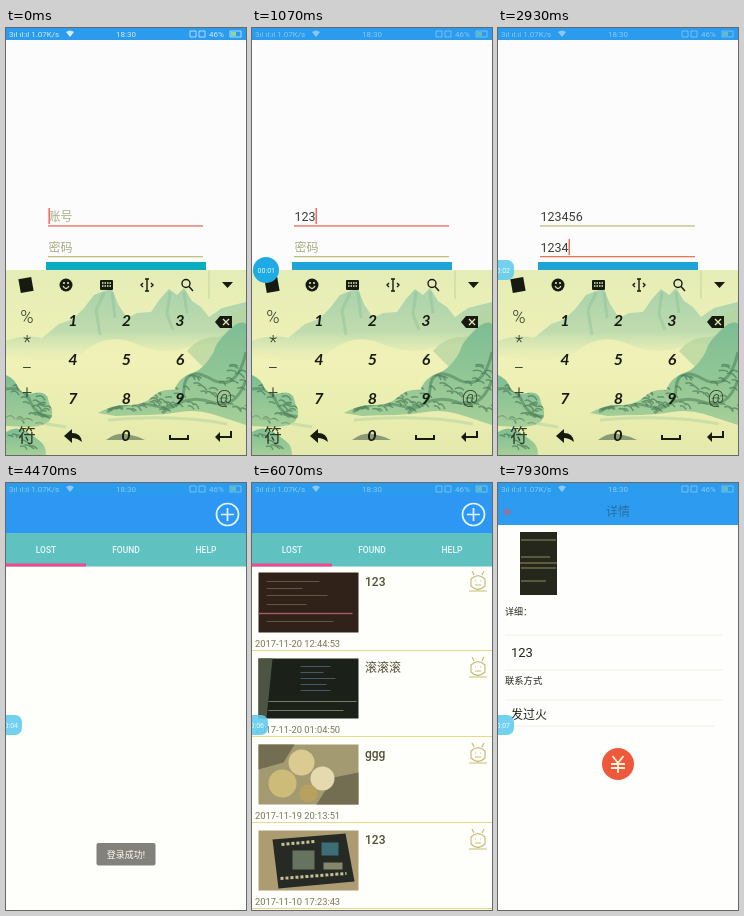
Recreate the animation shown at these times as an HTML page. Size 240 px wide and 427 px high, loop 8 s.

```html
<!DOCTYPE html>
<html lang="zh">
<head>
<meta charset="utf-8">
<style>
html, body { margin: 0; width: 100%; height: 100%; overflow: hidden; background: #fdfdfc; }
svg { display: block; width: 100vw; height: 100vh; }
text { font-family: Roboto, "Noto Sans CJK SC", "Noto Sans CJK", sans-serif; }
.mid { text-anchor: middle; }
.num { font: italic 700 16px Lato, sans-serif; text-anchor: middle; fill: #171a10; }
.sym { font-size: 18px; font-weight: 300; text-anchor: middle; fill: #303a24; }
.line { fill: none; stroke: #171a10; stroke-width: 2; }
.thin { stroke-width: 1.4; }
</style>
</head>
<body>
<svg viewBox="0 0 240 427" preserveAspectRatio="none">
  <defs>
    <linearGradient id="sky" x1="0" y1="0" x2="0" y2="1">
      <stop offset="0" stop-color="#e4edb6"/><stop offset=".5" stop-color="#f0f1b6"/><stop offset="1" stop-color="#e4eaab"/>
    </linearGradient>
    <linearGradient id="far" x1="0" y1="0" x2="0" y2="1">
      <stop offset="0" stop-color="#a9d2ab"/><stop offset=".6" stop-color="#c0dcae"/><stop offset="1" stop-color="#e8efb6" stop-opacity=".2"/>
    </linearGradient>
    <linearGradient id="near" x1="0" y1="0" x2="0" y2="1">
      <stop offset="0" stop-color="#7dbd94"/><stop offset="1" stop-color="#a5cf97"/>
    </linearGradient>
    <clipPath id="pages"><rect y="84" width="240" height="343"/></clipPath>
    <clipPath id="land">
      <path id="rightHill" d="M92 385Q108 376 122 377T146 369 168 362Q174 349 184 346T201 334 209 320 222 303 240 296V397Q222 391 206 386T174 384 143 387 110 388Z"/>
      <path id="leftHill" d="M0 347Q8 350 12 359T29 365 43 375Q49 385 44 392T20 399L0 398Z"/>
      <path id="rocks" d="M0 404Q10 397 21 404T36 415 40 427H0Z"/>
    </clipPath>
  </defs>
  <rect width="240" height="427" fill="#fcfcfd"/>

  <g id="login">
    <text id="user" x="42.5" y="193"/>
    <text id="pass" x="42.5" y="224"/>
    <rect id="userLine" x="42" y="197.3" width="155" height="1.3"/>
    <rect id="passLine" x="42" y="228" width="155" height="1.3"/>
    <rect id="caret" width="1.3" height="16" fill="#ef5548"/>
    <rect id="button" x="40" y="234" width="160" height="34"/>
    <g id="keyboard">
      <rect y="242" width="240" height="185" fill="url(#sky)"/>
      <path d="M0 313Q18 306 36 310L53 296 67 291 78 280 88 267 98 263 106 261 112 276 121 290 131 285 145 284 154 271 163 261 171 267 178 260 186 273 195 279 203 289 216 280 240 274V325Q208 310 183 319T130 316 79 323 0 327Z" fill="url(#far)"/>
      <path d="M98 265L90 282 94 307M106 264L109 290M164 264L161 286 167 302M178 264L181 285" fill="none" stroke="#82b795" stroke-width="3" opacity=".35"/>
      <path d="M181 323Q193 309 209 309T225 286L240 281V335L202 344Z" fill="#b5d49f" opacity=".75"/>
      <g fill="url(#near)"><use href="#rightHill"/><use href="#leftHill"/><use href="#rocks"/></g>
      <g clip-path="url(#land)">
        <path id="trees" fill="none" stroke="#39684a" stroke-width="1.5" opacity=".55"/>
        <path d="M101 384Q123 371 150 378T178 361 205 351 240 324M156 385Q181 365 205 374T240 352M0 361Q18 358 24 373T48 389" fill="none" stroke="#437b55" stroke-width="3" opacity=".5"/>
      </g>
      <path d="M0 388Q33 395 60 399M102 392Q170 386 221 396" fill="none" stroke="#a9cca0" stroke-width="3" opacity=".45"/>
      <path d="M100 412Q111 404 121 406T139 412Z" fill="#8a9b76"/>
      <path d="M203 243V271" stroke="#c1d39a"/>
      <rect x="13.500" y="250" width="13" height="14" fill="#171a10" transform="rotate(-10 20 257)"/>
      <g fill="#171a10">
        <circle cx="60" cy="257" r="6.500"/>
        <rect x="94" y="252" width="13" height="10" rx="1"/>
        <path d="M216 254H227L221.500 260ZM209 294L214 288H226V300H214Z"/>
        <path d="M58 408L66 401V405Q75 405 76 414 71 410 66 410V415Z"/>
        <path d="M209 409L214 404V408H224V403H226V410H214V414Z"/>
      </g>
      <path d="M96 255H105M96 258H105" stroke="#e2efb4" stroke-width="1.300" stroke-dasharray="1.500 1"/>
      <path d="M57 255H59M61 255H63M57 258Q60 263 63 258M217 291L223 297M223 291L217 297" stroke="#e2efb4" stroke-width="1.300" fill="none"/>
      <path class="line thin" d="M141 251V263M139 251H143M139 263H143M137 255L135 257 137 259M145 255L147 257 145 259M183 258.500L187 263"/>
      <path class="line" d="M164 407V411H182V407"/>
      <circle class="line thin" cx="180" cy="255.500" r="4"/>
      <g id="keys"></g>
    </g>
  </g>

  <g id="main">
    <rect width="240" height="427" fill="#fefefb"/>
    <g clip-path="url(#pages)"><g id="list"></g></g>
    <rect width="240" height="51" fill="#2d97f3"/>
    <rect y="50" width="240" height="33.500" fill="#5fc2c1"/>
    <g fill="#e8fafa" font-size="8.500" font-weight="500" class="mid">
      <text x="40" y="70">LOST</text><text x="120" y="70">FOUND</text><text x="200" y="70">HELP</text>
    </g>
    <rect id="mark" y="80.500" width="80" height="3" fill="#ef4b8e"/>
    <g fill="none" stroke="#e4f6ff" stroke-width="1.700">
      <circle cx="221.500" cy="31.500" r="11"/><path d="M215 31.500H228M221.500 25V38"/>
    </g>
  </g>

  <g id="detail">
    <rect width="240" height="427" fill="#fefefc"/>
    <rect width="240" height="42" fill="#2d9cf0"/>
    <path d="M14 29H7M10 25L6.500 29 10 33" fill="none" stroke="#c0627d" stroke-width="1.500"/>
    <text class="mid" x="120" y="33" font-size="12" fill="#286f9f">详情</text>
    <rect x="22" y="49" width="37" height="63" fill="#25271c"/>
    <path d="M23 57H58M23 74H52M23 85H58M23 98H48" stroke="#696b47" stroke-width="1.500"/>
    <path d="M22 80H59" stroke="#9c8d55"/>
    <g fill="#24241e">
      <text x="7" y="132" font-size="9" font-weight="500">详细：</text>
      <text x="13" y="174" font-size="13">123</text>
      <text x="7" y="201" font-size="9.300" font-weight="500">联系方式</text>
      <text x="13" y="236" font-size="12">发过火</text>
    </g>
    <path d="M7 152H225M7 187H225M7 217H225M13 243H216" stroke="#f0f0e6"/>
    <circle cx="120" cy="281" r="16" fill="#f0583c"/>
    <path d="M114.500 273L120 280 125.500 273M113 281H127M113 285H127M120 280V290" fill="none" stroke="#fff2d5" stroke-width="1.800"/>
  </g>

  <g id="toast">
    <rect x="90.500" y="360" width="59" height="22.500" rx="2" fill="#28251a"/>
    <text class="mid" x="120" y="375" font-size="9" fill="#fff8e8">登录成功!</text>
  </g>

  <g id="status">
    <rect width="240" height="12" fill="#2b9bee"/>
    <g id="info" fill="#fff" font-size="8">
      <text x="3" y="9">3ıl ıl:ıl 1.07K/s</text>
      <path d="M60 4Q64 1 68 4L64 9Z"/>
      <text class="mid" x="120" y="9">18:30</text>
      <text x="203" y="9">46%</text>
      <path d="M184 3H190V9H184ZM193 3H199V9H193ZM224 3H235V9H224Z" fill="none" stroke="#fff" stroke-width=".8"/>
      <rect x="225" y="4" width="5" height="4" fill="#a5e887"/>
    </g>
  </g>

  <g id="bubble">
    <rect id="blob"/>
    <text id="clock" y="244.500" font-size="7" fill="#e9faff"/>
  </g>
</svg>
<script>
const $ = id => document.getElementById(id);
const LOOP = 8000;
const typed = { user: [470, 670, 930, 1270, 1470, 1670], pass: [2270, 2470, 2600, 2800, 3070, 3270] };
const FOCUS = 2000;
const tabStops = [[4700, 0], [5000, 80], [5130, 80], [5400, 160], [5530, 160], [5730, 80], [5760, 80], [5950, 0]];

const set = (id, attrs) => { for (const k in attrs) $(id).setAttribute(k, attrs[k]); };
const show = (id, on) => { $(id).style.display = on ? '' : 'none'; };
const ramp = (t, a, b) => Math.min(1, Math.max(0, (t - a) / (b - a)));
const smooth = p => p * p * (3 - 2 * p);

function along(stops, t) {
  let value = stops[0][1];
  for (let i = 1; i < stops.length; i++) {
    const [a, from] = stops[i - 1], [b, to] = stops[i];
    if (t >= a) value = from + (to - from) * smooth(ramp(t, a, b));
  }
  return value;
}

const label = (cls, x, y, s) => `<text class="${cls}" x="${x}" y="${y}">${s}</text>`;
let keys = label('num', 120, 413, '0');
for (let i = 0; i < 9; i++) keys += label('num', 67 + i % 3 * 53.500, 297.500 + Math.floor(i / 3) * 39, i + 1);
['%', '*', '_', '+', '符'].forEach((s, i) => keys += label('sym', 21, [295, 320, 339, 370, 414][i], s));
$('keys').innerHTML = keys + label('sym', 218, 375, '@');

// Brushed foliage on the banks, clipped to the land
let seed = 7;
const random = () => (seed = seed * 16807 % 2147483647) / 2147483647;
const tuft = (x, y) => `M${x} ${y}q${2 + random() * 4} ${-4 + random() * 3} ${5 + random() * 5} ${random() * 5}`;
let trees = '';
for (let i = 0; i < 70; i++) {
  const x = 96 + random() * 144;
  trees += tuft(x, 382 - random() * (x - 90) * .38);
}
for (let i = 0; i < 28; i++) trees += tuft(random() * 42, 356 + random() * 40);
for (let i = 0; i < 9; i++) trees += tuft(random() * 30, 402 + random() * 20);
$('trees').setAttribute('d', trees);

// Simplified thumbnails, each 100 by 60
const photos = [
  `<rect width="100" height="60" fill="#302119"/><path d="M8 9H61M8 16H44M8 23H69M8 32H48M8 49H75" stroke="#655343"/>
   <path d="M0 41H94" stroke="#a15a67" stroke-width="1.500"/>`,
  `<rect width="100" height="60" fill="#1b2119"/><path d="M14 0L8 60H0V0Z" fill="#4d5441"/>
   <path d="M42 8H72M42 14H65M42 20H77M42 26H68M42 32H72" stroke="#455969"/><path d="M10 43H98M10 52H85" stroke="#777b62"/>`,
  `<rect width="100" height="60" fill="#a49a72"/><path d="M0 0H36L25 18 0 25ZM58 60L75 33 100 28V60Z" fill="#736e51"/>
   <circle cx="43" cy="18" r="13" fill="#d9cb91"/><circle cx="24" cy="39" r="14" fill="#cdbb79"/>
   <circle cx="64" cy="34" r="12" fill="#e4d9af"/><circle cx="50" cy="49" r="9" fill="#b8a15e"/>`,
  `<rect width="100" height="60" fill="#ad9c72"/><path d="M14 9L87 3 96 51 20 58Z" fill="#252b24"/>
   <path d="M34 20H56V39H34Z" fill="#66735e"/><path d="M63 12H80V25H63Z" fill="#3c6e76"/>
   <path d="M22 48L88 43M23 14L56 11" stroke="#c8c197" stroke-width="3" stroke-dasharray="3 2"/><path d="M65 32H84V39H65Z" fill="#86876a"/>`
];
const rows = [['123', '2017-11-20 12:44:53'], ['滚滚滚', '2017-11-20 01:04:50'], ['ggg', '2017-11-19 20:13:51'], ['123', '2017-11-10 17:23:43']];
$('list').innerHTML = rows.map(([title, date], i) => `<g transform="translate(0 ${84 + i * 86})">
  <g transform="translate(6.500 5.500)">${photos[i]}</g>
  <text x="113" y="18.500" font-size="12" font-weight="500" fill="#505033">${title}</text>
  <text x="3" y="79.500" font-size="9.300" fill="#77775a">${date}</text>
  <path d="M0 83.500H240" stroke="#e5d98a"/>
  <path d="M219 12Q226 5 233 12V19Q226 26 219 19ZM222 8L220 4M230 8L232 4M223 14H224M228 14H229M223 18H229M217 24H235" fill="none" stroke="#c8bc77" stroke-width="1.200"/>
</g>`).join('');

function field(id, t, hint) {
  const n = typed[id].filter(at => t >= at).length;
  $(id).textContent = n ? '123456'.slice(0, n) : hint;
  set(id, { fill: n ? '#3c3c36' : '#a9aa86', 'font-size': n ? 12.5 : 12 });
  return n;
}

function drawLogin(t) {
  const counts = { user: field('user', t, '账号'), pass: field('pass', t, '密码') };
  const onPass = t >= FOCUS, active = onPass ? 'pass' : 'user';
  set('userLine', { fill: onPass ? '#bfc07b' : '#e96758' });
  set('passLine', { fill: onPass ? '#e97555' : '#bfc07b' });
  const n = counts[active];
  const since = t - (n ? typed[active][n - 1] : onPass ? FOCUS : 0);
  set('caret', { x: 42.5 + n * 7.02, y: onPass ? 211 : 180 });
  show('caret', since % 1000 < 500);
  set('button', { fill: t < 70 ? '#08adbe' : t >= 3870 ? '#1685b4' : '#20a4d7' });
  set('keyboard', { transform: `translate(0 ${185 * smooth(ramp(t, 3530, 3800))})` });
}

function drawBubble(t) {
  show('bubble', t >= 400);
  const p = smooth(ramp(t, 1900, 2100));
  const r = 13 - 3 * p, right = 27 - 11 * p;
  set('blob', { x: right - 26, y: 242 - r, width: 26, height: 2 * r, rx: r - 3 * p, fill: p < .5 ? '#1eaae4' : '#5ecbed', opacity: 1 - .12 * p });
  set('clock', { x: right - 4, 'text-anchor': 'end' });
  $('clock').textContent = '00:0' + Math.max(0, Math.floor((t - 70) / 1000));
}

function draw(t) {
  drawLogin(t);
  drawBubble(t);
  const tab = along(tabStops, t);
  show('login', t < 4270);
  show('main', t >= 4270);
  set('mark', { x: tab });
  show('list', t >= 5100);
  set('list', { transform: `translate(${-3 * tab} 0)` });
  set('toast', { opacity: ramp(t, 4300, 4600) * (1 - ramp(t, 5800, 6000)) });
  set('detail', { opacity: smooth(ramp(t, 7400, 7650)) });
  set('info', { opacity: t < 70 ? .8 : .45 });
}

const start = performance.now();
function tick() {
  draw((performance.now() - start) % LOOP);
  requestAnimationFrame(tick);
}
tick();
</script>
</body>
</html>
```
